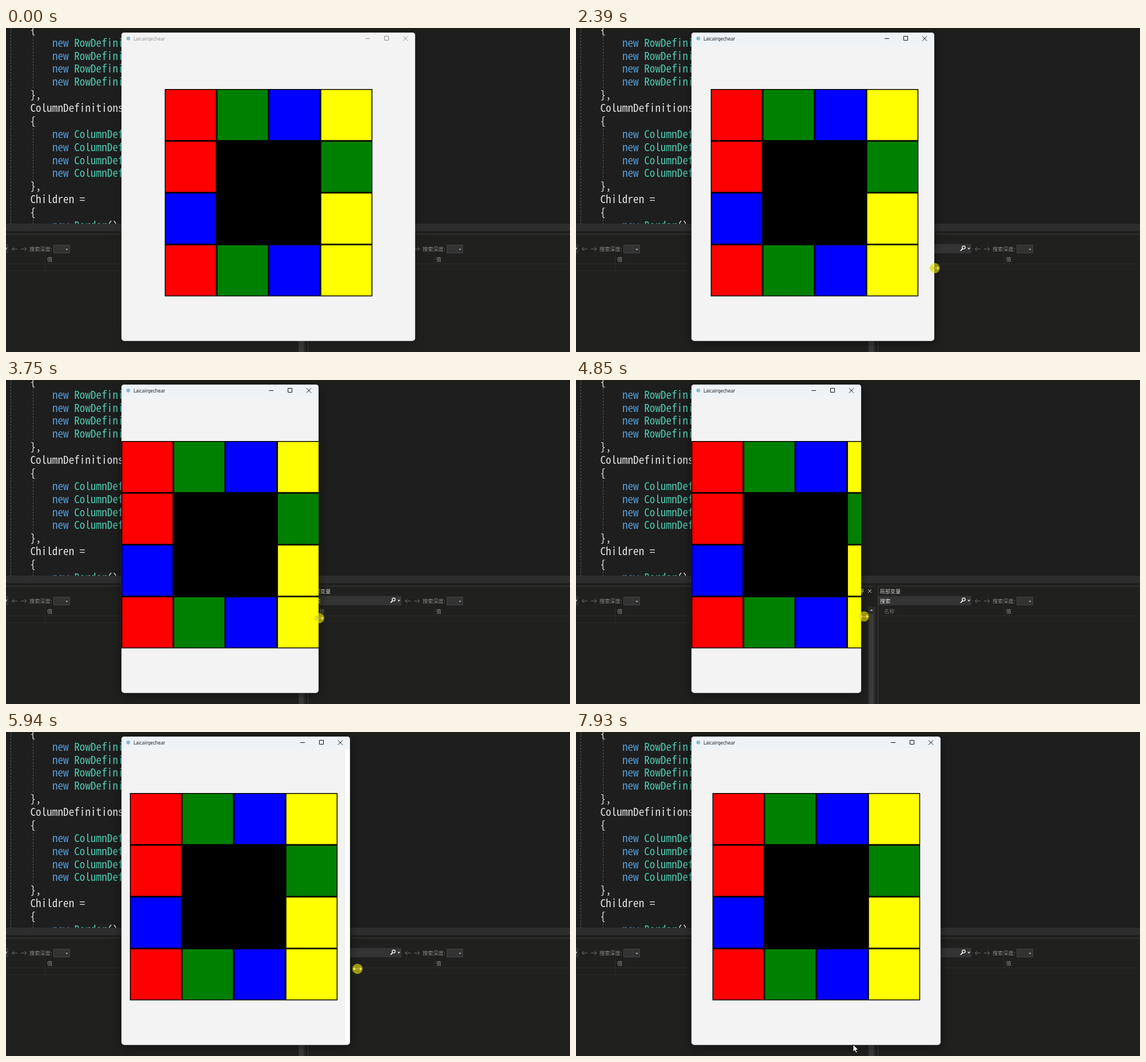
An HTML page that plays this animation: 987x568 px, repeating every 8000 ms.

```html
<!DOCTYPE html>
<html lang="zh">
<head>
<meta charset="utf-8">
<style>
html, body { margin: 0; width: 100%; height: 100%; overflow: hidden; background: #1e1e1e; }
svg { display: block; width: 987px; height: 568px; }
.code { font: 19.2px "Noto Sans Mono CJK SC", "Noto Sans Mono CJK JP", "Noto Sans Mono", monospace; fill: #e2e2e2; white-space: pre; }
.kw { fill: #569cd6; }
.type { fill: #4ec9b0; }
.ui { font: 9.2px "Noto Sans CJK SC", "Noto Sans CJK JP", "Noto Sans", sans-serif; fill: #8a8a8a; }
.title { font: 8.2px "Open Sans", "Noto Sans", sans-serif; }
.guide { stroke: #5c5c5c; stroke-dasharray: 3 2.5; }
.line { stroke: #2c2c2c; }
</style>
</head>
<body>
<svg viewBox="0 0 987 568">
  <defs>
    <clipPath id="editorClip"><rect width="987" height="343"/></clipPath>
    <clipPath id="windowClip"><rect id="clipBox" x="202" y="8" height="540.5" rx="5"/></clipPath>
    <filter id="blur" x="-20%" y="-20%" width="140%" height="140%"><feGaussianBlur stdDeviation="9"/></filter>
  </defs>

  <rect width="987" height="568" fill="#1e1e1e"/>
  <g id="code" class="code" clip-path="url(#editorClip)"></g>
  <path class="guide" d="M8.5 0V343M47.5 14V106M47.5 176V266M47.5 335V343"/>

  <rect y="343" width="987" height="13" fill="#2e2e2e"/>
  <rect y="356" width="987" height="212" fill="#20201e"/>
  <path d="M0 361.5H524M529 361.5H987" stroke="#393939"/>
  <path class="line" d="M0 413.5H511M529 413.5H987M0 425.5H202M68.5 397V425M535.5 397V413M749.5 397V413"/>
  <rect x="511" y="397" width="13" height="171" fill="#2b2b2b"/>
  <rect x="513" y="410" width="8" height="158" fill="#3b3b3b"/>
  <path d="M528.5 361V568" stroke="#393939"/>
  <path d="M514 405h6l-3-3.5z" fill="#999"/>
  <path d="M498 367h5M499.5 367v4M502 367v4M497.5 371h6M500.5 371v4M511 367l6 6M517 367l-6 6" stroke="#d0d0d0" fill="none"/>

  <g class="ui">
    <text x="531.5" y="373.5" style="fill:#c8c8c8">局部变量</text>
    <rect x="529" y="378.5" width="163" height="16.5" fill="#343434"/>
    <text x="532" y="390.5" style="fill:#e0e0e0">搜索</text>
    <circle cx="678.5" cy="384.8" r="2.6" fill="none" stroke="#eee" stroke-width="1.4"/>
    <path d="M676.5 387l-3.5 3.5" stroke="#eee" stroke-width="1.8"/>
    <path d="M685 385.5h5l-2.5 3z" fill="#ddd"/>
    <rect y="378.5" width="4" height="16.5" fill="#343434"/>
    <path d="M-2 385.5h4l-2 3z" fill="#ddd"/>
    <text x="539" y="408.5" style="fill:#707070">名称</text>
    <text x="72" y="408.5">值</text>
    <text x="752.5" y="408.5">值</text>
    <g id="depth">
      <path d="M20 387.5h-9.5m4-3.8l-4 3.8 4 3.8M26 387.5h10m-4-3.8l4 3.8-4 3.8" fill="none" stroke="#686868"/>
      <text x="41" y="390.8">搜索深度:</text>
      <rect x="83.5" y="380.5" width="28" height="14" fill="#333" stroke="#404040"/>
      <path d="M104 387h5l-2.5 2.8z" fill="#999"/>
    </g>
    <use href="#depth" x="688"/>
  </g>

  <rect id="shadow" x="202" y="12" height="540" rx="6" filter="url(#blur)"/>
  <g clip-path="url(#windowClip)">
    <rect x="202" y="8" width="600" height="541" fill="#fff"/>
    <rect id="content" x="202" y="8" height="541" fill="#f3f3f3"/>
    <rect id="bar" x="202" y="8" width="600" height="22"/>
    <circle cx="214" cy="18.3" r="3.4" fill="#8fbccd"/>
    <text id="title" class="title" x="223" y="21.7">Laicairqechear</text>
    <path id="buttons" fill="none" stroke-linejoin="round" d="M-87 18.5h8M-53.5 14.5h7v7h-7zM-21 14.5l8 8M-13 14.5l-8 8"/>
    <g id="grid"><rect y="107" width="363.4" height="363.4"/></g>
  </g>
  <rect id="edge" x="202" y="8" height="540.5" rx="5" fill="none" stroke="#777" stroke-opacity=".4" stroke-width=".6"/>

  <path id="resize" d="M-8 0l4-3.5v3h8v-3l4 3.5-4 3.5v-3h-8v3z" fill="#fff" stroke="#222" stroke-width=".5"/>
  <circle id="press" r="9" fill="#f2ea00" fill-opacity=".6"/>
  <path id="arrow" d="M0 0v12.5l2.9-2.6 2 4.6 2.2-1-2-4.4h4z" fill="#fff" stroke="#000" stroke-width=".8"/>
</svg>
<script>
const LOOP = 8000, LEFT = 202, LAYOUT_LAG = 66;
const GRAB = 1340, RELEASE = 6910, LEAVE = 7170;
const $ = id => document.getElementById(id);
const set = (id, attrs) => {
  for (const [key, value] of Object.entries(attrs)) $(id).setAttribute(key, value);
};
const show = (id, visible) => set(id, { visibility: visible ? 'visible' : 'hidden' });

const kw = s => `<tspan class="kw">${s}</tspan>`;
const type = s => `<tspan class="type">${s}</tspan>`;
const item = name => '    ' + kw('new ') + type(name);
const rows = Array(4).fill(item('RowDefini'));
const columns = Array(4).fill(item('ColumnDef'));
$('code').innerHTML = ['{', ...rows, '},', 'ColumnDefinitions', '{', ...columns, '},',
  'Children =', '{', item('Border') + '()']
  .map((s, i) => `<text x="42.5" y="${9.8 + 22.87 * i}" xml:space="preserve">${s}</text>`).join('');

const fills = { r: '#f00', g: '#008000', b: '#00f', y: '#ff0' };
const CELL = 90.8;
['rgby', 'r  g', 'b  y', 'rgby'].forEach((row, j) => [...row].forEach((c, i) => {
  if (c !== ' ') $('grid').insertAdjacentHTML('beforeend',
    `<rect x="${1.5 + CELL * i}" y="${108.5 + CELL * j}" width="88" height="88" fill="${fills[c]}"/>`);
}));

// Pointer key points as [time, value]; the window edge trails the pointer by a gap.
const pointerX = [[400, 797], [740, 682], [940, 716], [GRAB, 716], [1490, 712], [1560, 696],
  [2120, 674], [2320, 633], [2930, 587], [3750, 548], [3920, 558], [4330, 504], [4580, 527],
  [4850, 504], [5120, 504], [5940, 615], [6640, 641], [RELEASE, 643], [LEAVE, 643], [7590, 485]];
const pointerY = [[400, 489], [620, 430], [940, 421], [2450, 421], [4850, 414.5],
  [LEAVE, 416], [7590, 546], [7930, 548]];
const gap = [[GRAB, 0], [1560, 1], [4580, 1], [4850, 5], [5120, 5], [5940, 13], [6640, 5]];

function at(track, t) {
  const i = track.findIndex(key => key[0] > t);
  if (i === 0) return track[0][1];
  if (i < 0) return track[track.length - 1][1];
  const [t0, a] = track[i - 1], [t1, b] = track[i];
  return a + (b - a) * (t - t0) / (t1 - t0);
}

function edgeAt(t) {
  const dragTime = Math.min(Math.max(t, GRAB), RELEASE);
  return Math.round(at(pointerX, dragTime) - at(gap, dragTime));
}

function draw(t) {
  const right = edgeAt(t);
  const layout = edgeAt(t - LAYOUT_LAG);
  const width = right - LEFT;
  const active = t >= GRAB;
  for (const id of ['clipBox', 'shadow', 'edge']) set(id, { width });
  set('shadow', { opacity: active ? 0.5 : 0.25 });
  set('content', { width: Math.min(layout, right) - LEFT });
  set('bar', { fill: active ? '#eef3f7' : '#f3f3f3' });
  set('title', { fill: active ? '#111' : '#8c8c8c' });
  set('buttons', { stroke: active ? '#111' : '#8c8c8c', transform: `translate(${right})` });
  const gridX = Math.max(LEFT, (LEFT + layout) / 2 - 181.2);
  set('grid', { transform: `translate(${gridX})` });

  const transform = `translate(${at(pointerX, t)} ${at(pointerY, t)})`;
  for (const id of ['press', 'resize', 'arrow']) set(id, { transform });
  const resizing = t >= 900 && t < LEAVE;
  show('resize', resizing);
  show('press', active && resizing);
  show('arrow', t >= 400 && !resizing);
}

const start = performance.now();
function tick() {
  draw((performance.now() - start) % LOOP);
  requestAnimationFrame(tick);
}
draw(0);
requestAnimationFrame(tick);
</script>
</body>
</html>
```
